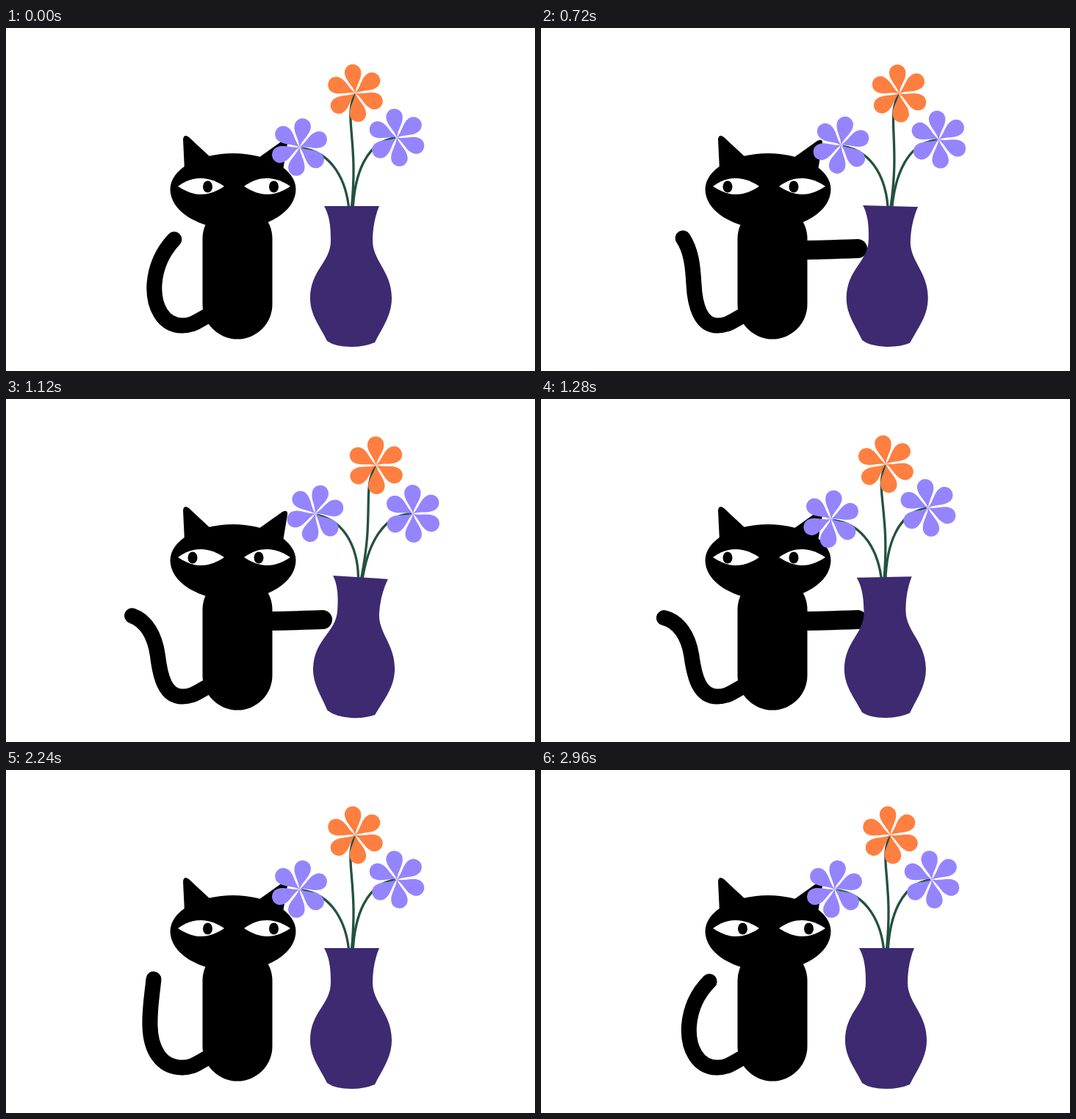
An HTML page for the animation above (3 s loop, 720 by 468 pixels).

```html
<!DOCTYPE html>
<html lang="en">
<head>
<meta charset="utf-8">
<title>Cat and vase</title>
<style>
  html, body { margin: 0; width: 100%; height: 100%; overflow: hidden; background: #fff; }
  svg { display: block; width: 100%; height: 100%; }
  .stem { fill: none; stroke: #24523f; stroke-width: 3.3; }
  .limb { fill: none; stroke: #000; stroke-linecap: round; stroke-linejoin: round; }
</style>
</head>
<body>
<svg viewBox="0 0 720 468">
  <defs>
    <path id="petal" d="M0 0C-3-12-11.2-18-11.2-28.3A11.2 11.2 0 0 1 11.2-28.3C11.2-18 3-12 0 0Z"/>
    <path id="eye" d="M234 216C245 208 255 205 265 205C278 205 288 210 297 216C288 222 278 227 265 227C255 227 245 223 234 216Z"/>
    <ellipse id="pupil" cx="274.5" cy="216.5" rx="6.5" ry="8"/>
  </defs>

  <path id="tail" class="limb" stroke-width="21"/>
  <path id="arm" class="limb" stroke-width="26"/>
  <rect x="267.5" y="240" width="95" height="184.5" rx="47.5"/>
  <path d="M223.5 220A85.5 49 0 0 1 394.5 220A85.5 54 0 0 1 223.5 220Z"/>
  <path d="M243 194L241 152Q242 144 249 149L279 177Z"/>
  <path d="M341 179L376 154Q384 150 383 158L377 194Z"/>
  <g fill="#fff"><use href="#eye"/><use href="#eye" x="90"/></g>
  <g id="pupils"><use href="#pupil"/><use href="#pupil" x="90"/></g>

  <g id="vase">
    <g id="bouquet">
      <path class="stem" d="M467 250C464 210 445 169 402 164"/>
      <path class="stem" d="M470 250C475 200 473 175 470 140C468 118 468 104 475 90"/>
      <path class="stem" d="M472 250C474 200 490 155 530 150"/>
    </g>
    <path fill="#3d2a70" d="M433 243H508C502 257 499 274 499 290C499 318 525 332 525 369C525 392 512 409 502 429Q488 435 470 435Q448 435 437 427C428 408 414 392 414 369C414 330 442 320 442 290C442 274 441 257 433 243Z"/>
  </g>
</svg>
<script>
const LOOP = 3000, STEP = 40;
const $ = id => document.getElementById(id);
const mix = (a, b, u) => a + (b - a) * u;

function addFlower(x, y, turn, color) {
  const petals = Array.from({ length: 6 }, (_, i) =>
    `<use href="#petal" transform="rotate(${i * 60})"/>`).join('');
  $('bouquet').insertAdjacentHTML('beforeend',
    `<g fill="${color}" transform="translate(${x} ${y}) rotate(${turn})">${petals}</g>`);
}
addFlower(475.5, 88.8, -7, '#ff7f40');
addFlower(399.5, 162.5, 8.5, '#9485ff');
addFlower(532, 149.5, -7, '#9485ff');

// Smooth step from 0 to 1 between two times.
function ramp(time, from, to) {
  const u = Math.min(1, Math.max(0, (time - from) / (to - from)));
  return u * u * (3 - 2 * u);
}

// Point at a distance from (x, y), with the angle in degrees clockwise from up.
function polar(x, y, degrees, length) {
  const a = degrees * Math.PI / 180;
  return [x + length * Math.sin(a), y - length * Math.cos(a)];
}

// The tail swings from its middle while the tip curls slightly ahead of it.
function tailPath(time) {
  const phase = 2 * Math.PI * time / LOOP;
  const sway = Math.sin(phase);
  const swing = -10 + 28.5 * Math.cos(phase + 0.16);
  const curl = -15 + 62 * Math.cos(phase + 0.35);
  const x = 202 + 6 * sway, lean = swing / 9;
  const tip = polar(208, 352, swing, 67);
  const bend = polar(...tip, curl + 180, 21);
  return `M285 388C265 395 258 406 240 406C${214 + 4 * sway} 406 ${x - lean} 380 ${x} 349`
    + `C${x + lean} 324 ${bend} ${tip}`;
}

const shoulder = [345, 303];
const curled = [362, 335, 385, 328, 404, 303];
const straight = [375, 303, 400, 302, 431, 301];

function armPath(time) {
  const out = ramp(time, 200, 440) - ramp(time, 1460, 1600);
  const reach = ramp(time, 440, 700) - ramp(time, 1300, 1460);
  const points = curled.map((v, i) => mix(shoulder[i % 2], mix(v, straight[i], reach), out));
  return `M${shoulder}C${points}`;
}

function draw(time) {
  $('tail').setAttribute('d', tailPath(time));
  $('arm').setAttribute('d', armPath(time));

  const glance = ramp(time, 80, 320) - ramp(time, 1720, 2000);
  $('pupils').setAttribute('transform', `translate(${-20.5 * glance} 0)`);

  // Pushed over, falls back past upright, then settles.
  const tilt = 7.4 * ramp(time, 620, 960) - 8.6 * ramp(time, 960, 1310) + 1.2 * ramp(time, 1310, 1440);
  $('vase').setAttribute('transform', `rotate(${tilt} 471 432)`);
  $('bouquet').setAttribute('transform', `rotate(${0.54 * Math.max(0, tilt)} 470 275)`);
}

const start = performance.now();
function tick() {
  const time = (performance.now() - start) % LOOP;
  draw(Math.floor(time / STEP) * STEP);
  requestAnimationFrame(tick);
}
tick();
</script>
</body>
</html>
```
